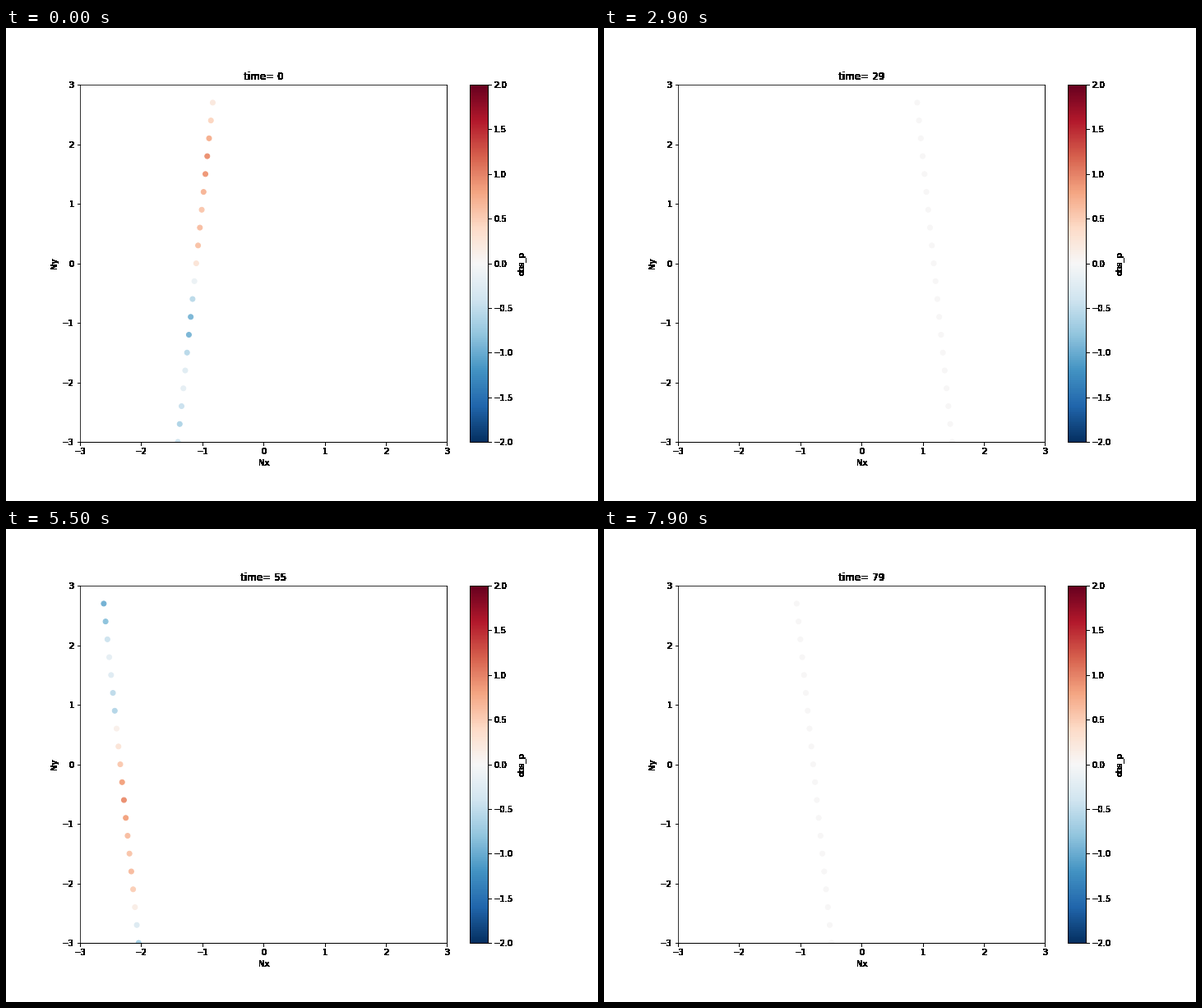
Write a matplotlib script that moves like this. It is 720 by 576 pixels and loops after 8000 ms.

```python
import numpy as np
import matplotlib.pyplot as plt
from matplotlib.animation import FuncAnimation

FRAMES, STEP = 80, 100
HOLD = 5  # frames per pass; only the first one carries data

plt.rcParams.update({"font.family": "DejaVu Sans", "font.size": 10,
                     "figure.subplot.bottom": 0.125})

y = -3 + 0.3 * np.arange(20)

# (pass, crossing of y = 0): turning points of the drift between passes
TURNS = [(0, -1.1), (1, -1.34), (4, 2.66), (6, -0.3), (7, 2.04),
         (9, -2.825), (12, -2.1), (14, 0.92), (15, -0.79)]


def track(k):
    slope = 0.1 * (-1) ** k
    return np.column_stack([np.interp(k, *zip(*TURNS)) + slope * y, y])


def bump(u, height, center, width):
    return height * np.exp(-((u - center) / width) ** 2)


def pressure(k):
    """Two highs and two lows that move along y from pass to pass."""
    u = (y + 3 + 1.3 * k) % 6 - 3
    return (bump(u, 0.92, 1.7, 0.8) + bump(u, 0.55, 0.4, 0.5)
            + bump(u, -0.95, -1.05, 0.6) + bump(u, -0.6, -2.7, 0.5))


def solid(img, dpi):
    """Turn every touched pixel fully black."""
    out = np.zeros_like(img)
    out[..., 3] = img[..., 3] > 0
    return out, 0, 0


fig, ax = plt.subplots(figsize=(10, 8), dpi=72, facecolor="white")
dots = ax.scatter(*track(0).T, c=pressure(0), linewidths=1,
                  cmap="RdBu_r", vmin=-2, vmax=2)
bar = fig.colorbar(dots, ax=ax, label="obs_p")
ax.set(xlim=(-3, 3), ylim=(-3, 3), xlabel="Nx", ylabel="Ny")
title = ax.set_title("time= 0", fontsize=12)

# Text, ticks and the right and bottom borders have hard edges
hard = [title, ax.xaxis, ax.yaxis, bar.ax.yaxis]
for axes in (ax, bar.ax):
    for side in ("right", "bottom"):
        axes.spines[side].set_visible(True)
        hard.append(axes.spines[side])
for part in hard:
    part.set_agg_filter(solid)


def update(t):
    k, age = divmod(t, HOLD)
    dots.set_offsets(track(k))
    dots.set_array(pressure(k) if age == 0 else np.zeros(len(y)))
    title.set_text(f"time= {t}")
    return dots, title


anim = FuncAnimation(fig, update, frames=FRAMES, interval=STEP,
                     repeat=True, repeat_delay=0, blit=False)
plt.show()
```
